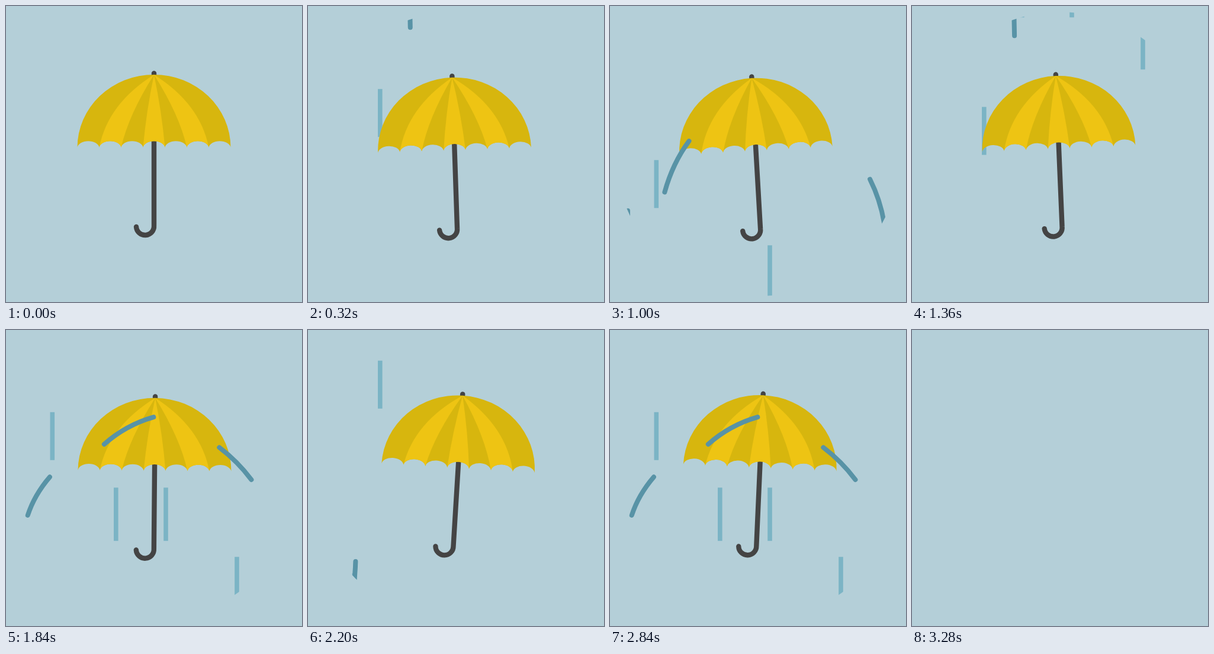
An HTML page for the animation above (3.32 s loop, 500x500 px).

```html
<!DOCTYPE html>
<html lang="en">
<head>
<meta charset="utf-8">
<title>Umbrella in the rain</title>
<style>
  html, body { margin: 0; width: 100%; height: 100%; overflow: hidden; background: #b4cfd8; }
  svg { display: block; width: 100vw; height: 100vh; }
  .drop { fill: none; }
  .far { stroke: #7bb4c5; stroke-width: 7.6; }
  .near { stroke: #5893a6; stroke-width: 8; stroke-linecap: round; stroke-linejoin: round; }
  .pole { fill: none; stroke: #444; stroke-width: 8.4; stroke-linecap: round; }
</style>
</head>
<body>
<svg viewBox="0 0 500 500">
  <defs>
    <clipPath id="sky"><circle cx="250" cy="250" r="240"/></clipPath>
    <clipPath id="dome"><path id="domeShape"/></clipPath>
  </defs>
  <g id="scene">
    <g id="farRain" clip-path="url(#sky)"></g>
    <g id="umbrella">
      <path class="pole" d="M250 113.6V119M250 215V371A15 15 0 0 1 220 373"/>
      <g clip-path="url(#dome)">
        <rect x="110" y="110" width="280" height="140" fill="#d7b60e"/>
        <g id="panels" fill="#eec413"></g>
      </g>
    </g>
    <g id="nearRain" clip-path="url(#sky)"></g>
  </g>
</svg>
<script>
const LOOP = 3320, STEP = 40, BLANK_AT = 3280, CYCLE = 1000;
const $ = id => document.getElementById(id);

function addPath(parent, d, cls) {
  const p = document.createElementNS('http://www.w3.org/2000/svg', 'path');
  p.setAttribute('d', d);
  if (cls) p.setAttribute('class', cls);
  parent.appendChild(p);
  return p;
}

// Canopy: half ellipse with seven scallops
const RIM = 239, LEFT = 120.5, SCALLOP = 37;
$('domeShape').setAttribute('d',
  `M${LEFT} ${RIM}A129.5 123 0 0 1 379.5 ${RIM}` +
  `a18.6 12 0 0 0 ${-SCALLOP} 0`.repeat(7) + 'Z');

// Light panels: seam from the top to the rim and back
const seams = [[172, 165, 157.5], [207, 184, 194.5], [237, 178, 231.5]];
const mirror = ([cx, cy, x]) => [500 - cx, cy, 500 - x];
const panel = (a, b) =>
  addPath($('panels'), `M250 116Q${a[0]} ${a[1]} ${a[2]} ${RIM}H${b[2]}Q${b[0]} ${b[1]} 250 116Z`);
panel(seams[0], seams[1]);
panel(seams[2], mirror(seams[2]));
panel(mirror(seams[1]), mirror(seams[0]));

// Drops: delay, start = tail offset along the path, speed, len, first = first cycle
const far = (x, delay, start, speed, len, first = 0) =>
  ({ group: 'farRain', cls: 'drop far', d: `M${x} 0V500`, delay, start, speed, len, first });
const near = (d, delay, start, speed, len) =>
  ({ group: 'nearRain', cls: 'drop near', d, delay, start, speed, len, first: 0 });

const drops = [
  far(121.8, 0, -27, .76, 81),
  far(390, 200, -27, .76, 81, 1),
  far(78.3, 522, -27, .76, 81),
  far(270, 350, -71, .865, 90),
  far(185.8, 350, -71, .865, 90, 1),
  near('M172 0Q173 60 177 180C110 200 38 265 30 345V480', 256, -48, .73, 75),
  near('M251 0L250 147C175 168 85 240 80 400L78 430', 477, -89, .9, 96),
  near('M319 0L318 172C375 200 452 268 465 380V480', 380, -57, .775, 77)
];
for (const drop of drops) drop.el = addPath($(drop.group), drop.d, drop.cls);

// Distance at unit speed, easing in and out over RAMP
const LIFE = 900, RAMP = 300;
function travel(u) {
  const rise = Math.max(0, 1 - u / RAMP);
  const fall = Math.max(0, u - LIFE + RAMP);
  return u - RAMP / 3 * (1 - rise ** 3) - fall ** 3 / (3 * RAMP * RAMP);
}

function drawDrop(drop, t) {
  const n = Math.floor((t - drop.delay) / CYCLE);
  const u = t - drop.delay - n * CYCLE;
  const on = n >= drop.first && u > 0 && u < LIFE;
  drop.el.style.display = on ? '' : 'none';
  if (!on) return;
  const tail = drop.start + drop.speed * travel(u);
  drop.el.setAttribute('stroke-dasharray', `${drop.len} 2000`);
  drop.el.setAttribute('stroke-dashoffset', -tail);
}

// Sway: time, angle, x, y
const sway = [
  [0, 0, 0, 0],
  [640, -3.3, -3.4, 7.7],
  [1360, -2.4, -1.5, 2],
  [1840, .5, .9, -1.2],
  [2200, 3.5, 2.9, -5.5],
  [2840, 2.55, 2.7, -6]
];
function keyAt(i) {
  const n = sway.length, turn = Math.floor(i / n);
  const [time, ...pose] = sway[i - turn * n];
  return [time + turn * LOOP, ...pose];
}
function poseAt(t) {
  let i = sway.length - 1;
  while (sway[i][0] > t) i--;
  const [a, b, c, d] = [-1, 0, 1, 2].map(k => keyAt(i + k));
  const span = c[0] - b[0], s = (t - b[0]) / span;
  return [1, 2, 3].map(k => {
    const m0 = (c[k] - a[k]) / (c[0] - a[0]) * span;
    const m1 = (d[k] - b[k]) / (d[0] - b[0]) * span;
    return b[k] * (1 + 2 * s) * (1 - s) ** 2 + m0 * s * (1 - s) ** 2 +
           c[k] * s * s * (3 - 2 * s) + m1 * s * s * (s - 1);
  });
}

function draw(t) {
  $('scene').style.display = t < BLANK_AT ? '' : 'none';
  const [angle, x, y] = poseAt(t);
  $('umbrella').setAttribute('transform', `translate(${x} ${y}) rotate(${angle} 250 250)`);
  for (const drop of drops) drawDrop(drop, t);
}

const begin = performance.now();
function tick() {
  const t = (performance.now() - begin) % LOOP;
  draw(Math.floor(t / STEP) * STEP);
  requestAnimationFrame(tick);
}
draw(0);
requestAnimationFrame(tick);
</script>
</body>
</html>
```
